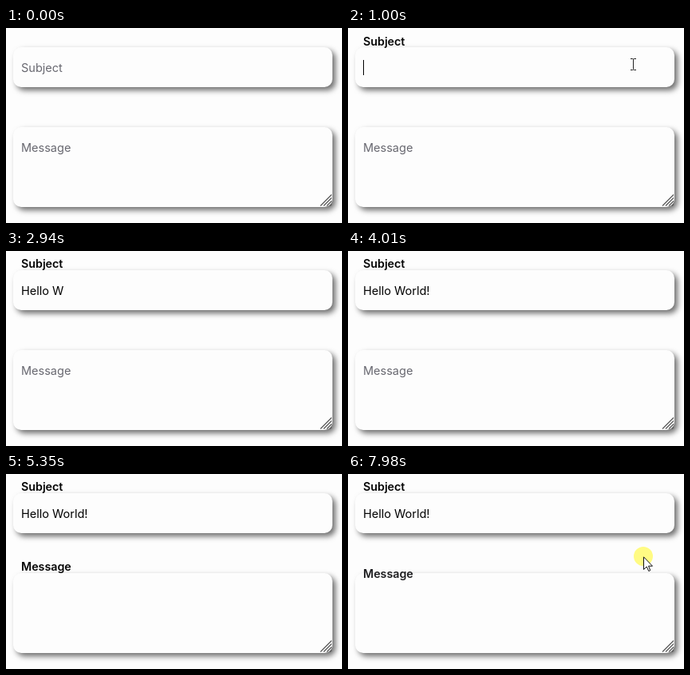
These frames come from a looping animation (421 by 244 pixels, 8 s). An HTML page:

```html
<!DOCTYPE html>
<html lang="en">
<head>
<meta charset="utf-8">
<title>Floating labels</title>
<style>
html, body { margin: 0; width: 100%; height: 100%; overflow: hidden; background: #fdfdfd; }
#stage {
  position: relative; width: 421px; height: 244px; overflow: hidden;
  font: 14.5px/20px Inter, Roboto, sans-serif;
}
#stage > * { position: absolute; }
.field {
  left: 9px; width: 400px; background: #fdfdfd; border-radius: 10px;
  box-shadow: 4px 4px 7px rgba(0, 0, 0, .57);
}
.line { left: 19px; height: 20px; white-space: pre; color: #000; }
.label.bold { font-weight: 600; font-size: 14.25px; }
.caret { position: absolute; left: 100%; top: 0; width: 1px; height: 19px; background: #000; }
svg { left: 0; top: 0; }
</style>
</head>
<body>
<div id="stage">
  <div class="field" style="top:24px;height:50px"></div>
  <div class="field" style="top:124px;height:100px"></div>
  <div class="line" style="top:40px"><span id="typed"></span><i class="caret" id="caret1"></i></div>
  <div class="line" style="top:141px"><i class="caret" id="caret2"></i></div>
  <div class="line label" id="subject" style="top:40px">Subject</div>
  <div class="line label" id="message" style="top:140px">Message</div>
  <svg width="421" height="244" fill="none">
    <path d="M394 222.5l14-14M398 222.5l10-10M402 222.5l6-6M406 222.5l2-2" stroke="#555" stroke-width="1.1"/>
    <circle id="disc" r="12" fill="#fffb83"/>
    <path id="beam" d="M-3.5-6.5h2.5q1 0 1 1q0-1 1-1h2.5M0-6V6M-3.5 7.5h2.500q1 0 1-1q0 1 1 1h2.500" stroke="#222"/>
    <path id="arrow" d="M.5 .8V16.5L4.2 13L6.800 18.500L8.800 17.600L6.500 12.200H11.500Z" fill="#fff" stroke="#111"/>
  </svg>
</div>
<script>
// All times below count screen refreshes, about 15 a second.
const LOOP = 8000, REFRESH = 66.9, OFFSET = 49;
const RISE = 34, FADE = 4.5, BLINK = 8;
const FOCUS = 11, TAB = 71, RETURN = 108, BLUR = 117;
const TEXT = "Hello World!";
const KEYS = [22, 25, 28, 31, 34, 39, 42.9, 44, 47, 49, 50.9, 58];

const $ = id => document.getElementById(id);
const show = (el, on) => { el.style.visibility = on ? "visible" : "hidden"; };
const mix = (a, b, p) => a + (b - a) * p;

function place(id, point) {
  show($(id), point);
  if (point) $(id).setAttribute("transform", `translate(${point[0]} ${point[1]})`);
}

// cubic-bezier(.25, .1, .25, 1)
function ease(x) {
  if (x <= 0) return 0;
  if (x >= 1) return 1;
  const curve = (s, a, b) => 3 * s * (1 - s) ** 2 * a + 3 * s * s * (1 - s) * b + s ** 3;
  let lo = 0, hi = 1;
  for (let i = 0; i < 20; i++) {
    const mid = (lo + hi) / 2;
    if (curve(mid, 0.25, 0.25) < x) lo = mid; else hi = mid;
  }
  return curve(lo, 0.1, 1);
}

function placeLabel(el, p) {
  const grey = Math.round(mix(104, 4, p));
  el.style.transform = `translateY(${-RISE * p}px)`;
  el.style.color = `rgb(${grey},${grey},${grey + Math.round(8 * (1 - p))})`;
  el.classList.toggle("bold", p > 0);
}

// A key press shows the caret; the steady blink clock then toggles it.
function caretOn(n, focus, lastKey = focus) {
  const ticks = time => Math.floor((time - focus) / BLINK);
  return n >= focus && (ticks(n) - ticks(lastKey)) % 2 === 0;
}

// The pointer hides while typing.
function pointer(n) {
  const glide = (a, b, p) => [mix(a[0], b[0], p), mix(a[1], b[1], p)];
  const field = [357.5, 45], turn = [375, 83], rest = [370, 103];
  const out = p => p * (2 - p);
  if (n < 7 || (n >= KEYS[0] && n < RETURN)) return null;
  if (n < KEYS[0]) return glide([374.5, 49], field, out(Math.min(1, (n - 7) / 3)));
  if (n < 110) return glide(field, turn, ((n - 107) / 3) ** 2);
  return glide(turn, rest, out(Math.min(1, (n - 110) / 4)));
}

function draw(t) {
  const n = Math.floor((t - OFFSET) / REFRESH);

  placeLabel($("subject"), ease((n - 10.5) / FADE));
  placeLabel($("message"), ease((n - 70.87) / FADE) - ease((n - 117.18) / FADE));

  const pressed = KEYS.filter(key => key <= n);
  $("typed").textContent = TEXT.slice(0, pressed.length);
  show($("caret1"), n < TAB && caretOn(n, FOCUS, pressed.at(-1)));
  show($("caret2"), n < BLUR && caretOn(n, TAB));

  const tip = pointer(n);
  place("beam", n < 110 && tip);
  place("arrow", n >= 110 && tip);
  place("disc", n >= BLUR ? tip : n >= 10 && n < 14 && [355, 44]);
}

const start = performance.now();
function tick() {
  draw((performance.now() - start) % LOOP);
  requestAnimationFrame(tick);
}
tick();
</script>
</body>
</html>
```
